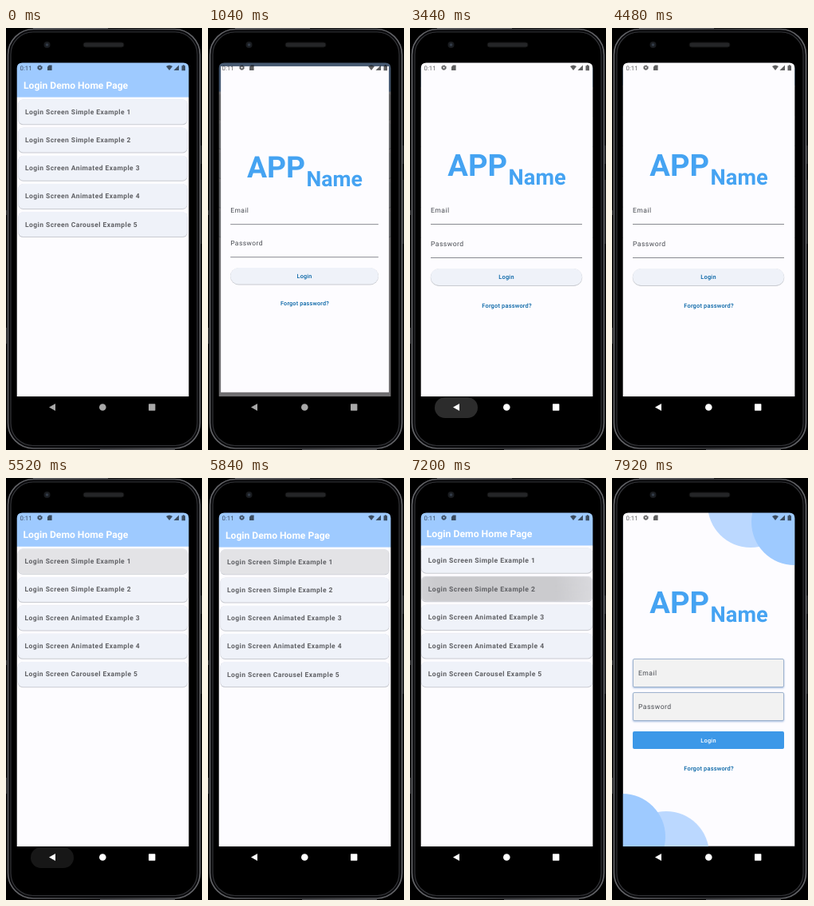
Recreate the animation shown at these times as an HTML page. Size 246x528 px, loop 8 s.

```html
<!DOCTYPE html>
<html lang="en">
<head>
<meta charset="utf-8">
<title>Login demo</title>
<style>
html, body { margin: 0; width: 100%; height: 100%; overflow: hidden; background: #000; }
svg { display: block; width: 246px; height: 528px; font-family: Roboto, sans-serif; text-rendering: geometricPrecision; }

.title { font-weight: 700; font-size: 12.1px; fill: #fff; }
.tile { fill: #eff2f9; }
.shade { fill: #c9cbd1; }
.tile-label { font-weight: 700; font-size: 8.5px; letter-spacing: .43px; fill: #606165; }
.logo { font-weight: 700; fill: #45a3f2; }
.label { font-size: 8.6px; letter-spacing: .46px; fill: #484b51; }
.action { font-weight: 500; font-size: 7.4px; letter-spacing: .2px; fill: #0061a4; text-anchor: middle; }
.field { fill: #f2f2f2; stroke: #8ea6c6; stroke-width: .8; filter: drop-shadow(0 1px 1px rgba(70, 120, 190, .5)); }
.status { fill: #000; opacity: .62; font-size: 7.8px; }

/* One loop is 8 s, so 1% is 80 ms. */
.anim { animation: 8s linear infinite; }
.zoom { transform-origin: 121.5px 252px; }
#home { animation-name: home; }
.page { animation-name: page; }
.page > g { animation-name: page-fade; }
#late { animation-name: late; }
#late .anim { animation-delay: -1760ms; }
#scrim { animation-name: scrim; }
#press1 { animation-name: press1; }
#press2 { animation-name: press2; }
#splash { animation-name: splash; transform-origin: 108px 140px; }
#keys { animation-name: keys; }
#ripple { animation-name: ripple; transform-origin: 58px 475px; }

@keyframes home {
  0% { transform: none; }
  11.6%, 89.6% { transform: scale(1); animation-timing-function: cubic-bezier(.05, 0, .1333, .06); }
  12.225%, 90.225% { transform: scale(1.02); animation-timing-function: cubic-bezier(.2083, .82, .25, 1); }
  15.35%, 93.35%, 100% { transform: scale(1.05); }
  67% { transform: scale(1.1); animation-timing-function: cubic-bezier(.05, 0, .1333, .06); }
  67.625% { transform: scale(1.06); animation-timing-function: cubic-bezier(.2083, .82, .25, 1); }
  70.75% { transform: scale(1); }
}
@keyframes page {
  0% { transform: scale(.85); }
  11.6% { transform: scale(.85); animation-timing-function: cubic-bezier(.05, 0, .1333, .06); }
  12.225% { transform: scale(.91); animation-timing-function: cubic-bezier(.2083, .82, .25, 1); }
  15.35% { transform: scale(1); }
  67% { transform: scale(1); animation-timing-function: cubic-bezier(.05, 0, .1333, .06); }
  67.625% { transform: scale(.96); animation-timing-function: cubic-bezier(.2083, .82, .25, 1); }
  70.75%, 100% { transform: scale(.9); }
}
@keyframes page-fade {
  0%, 12.07% { opacity: 0; }
  12.54%, 67.31% { opacity: 1; }
  67.78%, 100% { opacity: 0; }
}
@keyframes late {
  0%, 89% { visibility: hidden; }
  89.01%, 100% { visibility: visible; }
}
@keyframes scrim {
  0%, 12.28% { opacity: 0; }
  13.07%, 15.35% { opacity: .6; }
  15.36%, 90.28% { opacity: 0; }
  91.07%, 100% { opacity: .6; }
}
@keyframes press1 {
  0%, 10.5% { opacity: 0; }
  11.6%, 73% { opacity: 1; }
  78%, 100% { opacity: 0; }
}
@keyframes press2 {
  0%, 79.5% { opacity: 0; }
  82%, 100% { opacity: 1; }
}
@keyframes splash {
  0%, 79.5% { transform: scale(0); animation-timing-function: ease-out; }
  88%, 100% { transform: scale(1); }
}
@keyframes keys {
  0%, 38.5% { fill: #a8a8a8; }
  41%, 100% { fill: #fff; }
}
@keyframes ripple {
  0%, 38.5%, 62.5% { transform: scale(.3, 1); opacity: 0; animation-timing-function: ease-out; }
  41.5%, 65.5% { transform: scale(1); opacity: .22; }
  49%, 71.5%, 100% { transform: scale(1); opacity: 0; }
}
</style>
</head>
<body>
<svg viewBox="0 0 246 528">
  <defs>
    <clipPath id="screen"><path d="M13.7 461V50Q13.7 43.4 20.5 43.4H222.5Q229.4 43.4 229.4 50V461Z"/></clipPath>
    <clipPath id="tile2"><rect x="15.5" y="124.5" width="212" height="31" rx="6"/></clipPath>
    <radialGradient id="ink">
      <stop offset=".6" stop-color="#cbcbce"/>
      <stop offset="1" stop-color="#cbcbce" stop-opacity="0"/>
    </radialGradient>
    <linearGradient id="rim" x2="1" y2="0">
      <stop offset="0" stop-color="#66676b"/>
      <stop offset=".5" stop-color="#3a3b3e"/>
      <stop offset="1" stop-color="#66676b"/>
    </linearGradient>
    <g id="logo" class="logo">
      <text x="47.3" y="185" font-size="38.1">APP</text>
      <text x="123.6" y="196.4" font-size="27.2">Name</text>
    </g>
    <g id="dots">
      <circle cx="174" cy="33" r="54" fill="#bbd8ff"/>
      <circle cx="229" cy="55" r="54" fill="#9ecaff"/>
    </g>
  </defs>

  <!-- Phone body -->
  <rect width="246" height="528"/>
  <rect x="2.5" y="1.5" width="241" height="524.5" rx="32" fill="#08080a" stroke="url(#rim)" stroke-width="1.6"/>
  <rect x="6" y="5" width="234" height="517.5" rx="28" fill="#000" stroke="#333438" stroke-width="1.2"/>
  <path d="M34 .5H128M118 527.5H212" stroke="#505155"/>
  <path d="M244.8 147V170M244.8 190V270M.6 228V234M.6 375V395" stroke="#3a3a3c" stroke-width="1.2"/>
  <rect x="97" y="18" width="51" height="6" rx="3" fill="#242527" stroke="#111"/>
  <circle cx="51.5" cy="21" r="4" fill="#1a1c20"/>
  <circle cx="51.5" cy="21" r="1.8" fill="#333c48"/>

  <g clip-path="url(#screen)">
    <g id="home" class="anim zoom">
      <rect x="13" y="43" width="217" height="418" fill="#fdfcff"/>
      <rect x="13" y="43" width="217" height="43.6" fill="#9ecaff"/>
      <text class="title" x="22" y="76">Login Demo Home Page</text>
      <g id="tiles"></g>
      <rect id="press1" class="anim" x="15.5" y="89.3" width="212" height="31" rx="6" fill="#e3e3e6"/>
      <g clip-path="url(#tile2)">
        <g id="press2" class="anim">
          <rect x="15" y="124" width="213" height="32" fill="#dcdce0"/>
          <circle id="splash" class="anim" cx="108" cy="140" r="125" fill="url(#ink)"/>
        </g>
      </g>
      <g id="labels" class="tile-label"></g>
    </g>
    <rect id="scrim" class="anim" x="13" y="43" width="217" height="418"/>

    <g class="page anim zoom"><g class="anim">
      <rect x="13.7" y="43" width="215.7" height="417.5" fill="#fdfcff"/>
      <use href="#logo"/>
      <text class="label" x="26" y="231">Email</text>
      <text class="label" x="26" y="272.5">Password</text>
      <path d="M26 245.5H216M26 287.5H216" stroke="#7b7d83" stroke-width=".9"/>
      <rect class="shade" x="25.8" y="301.3" width="190.4" height="21.7" rx="10.8"/>
      <rect class="tile" x="26" y="301" width="190" height="21" rx="10.5"/>
      <text class="action" x="121" y="314.3">Login</text>
      <text class="action" x="121.5" y="349.5">Forgot password?</text>
    </g></g>

    <g id="late" class="anim"><g class="page anim zoom"><g class="anim">
      <rect x="13.7" y="43" width="215.7" height="417.5" fill="#fdfcff"/>
      <use href="#dots"/>
      <use href="#dots" transform="rotate(180 121 252)"/>
      <use href="#logo" y="-16"/>
      <rect class="field" x="26.5" y="226.5" width="189" height="35" rx="1.5"/>
      <rect class="field" x="26.5" y="268.5" width="189" height="35" rx="1.5"/>
      <text class="label" x="33" y="247">Email</text>
      <text class="label" x="33" y="289">Password</text>
      <rect x="26" y="317" width="190" height="22" rx="2" fill="#3c98e8"/>
      <text class="action" x="121" y="330.7" style="fill:#fff">Login</text>
      <text class="action" x="121.5" y="366">Forgot password?</text>
    </g></g></g>

    <g class="status">
      <text x="17.5" y="52.6">0:11</text>
      <circle cx="42.5" cy="49.6" r="1.9" fill="none" stroke="#000" stroke-width="1.6"/>
      <circle cx="42.5" cy="49.6" r="2.9" fill="none" stroke="#000" stroke-width="1" stroke-dasharray="1.2 1.08"/>
      <path d="M52 48.5L54 46.5H57.6V53H52Z"/>
      <path d="M201 48Q205 45 209 48L205 53Z"/>
      <path d="M210.5 53H217V46.5Z"/>
      <path d="M220.5 47.2H221.8V46.2H223.8V47.2H225V53.2H220.5Z"/>
    </g>
  </g>

  <!-- Navigation bar -->
  <rect id="ripple" class="anim" x="31" y="462" width="54" height="26" rx="13" fill="#fff"/>
  <g id="keys" class="anim">
    <path d="M54 474.5L62 470V479Z"/>
    <circle cx="121.3" cy="474.5" r="4.3"/>
    <rect x="179" y="470.3" width="8.4" height="8.4" rx=".6"/>
  </g>
</svg>
<script>
const NS = "http://www.w3.org/2000/svg";
const add = (parent, tag, attrs, text = "") => {
  const node = document.createElementNS(NS, tag);
  for (const key in attrs) node.setAttribute(key, attrs[key]);
  node.textContent = text;
  document.getElementById(parent).append(node);
};
["Simple", "Simple", "Animated", "Animated", "Carousel"].forEach((kind, i) => {
  const y = 89.3 + i * 35.2;
  add("tiles", "rect", { class: "shade", x: 15.2, y: y + .3, width: 212.6, height: 31.7, rx: 6.3 });
  add("tiles", "rect", { class: "tile", x: 15.5, y, width: 212, height: 31, rx: 6 });
  add("labels", "text", { x: 24, y: y + 18.4 }, `Login Screen ${kind} Example ${i + 1}`);
});
</script>
</body>
</html>
```
